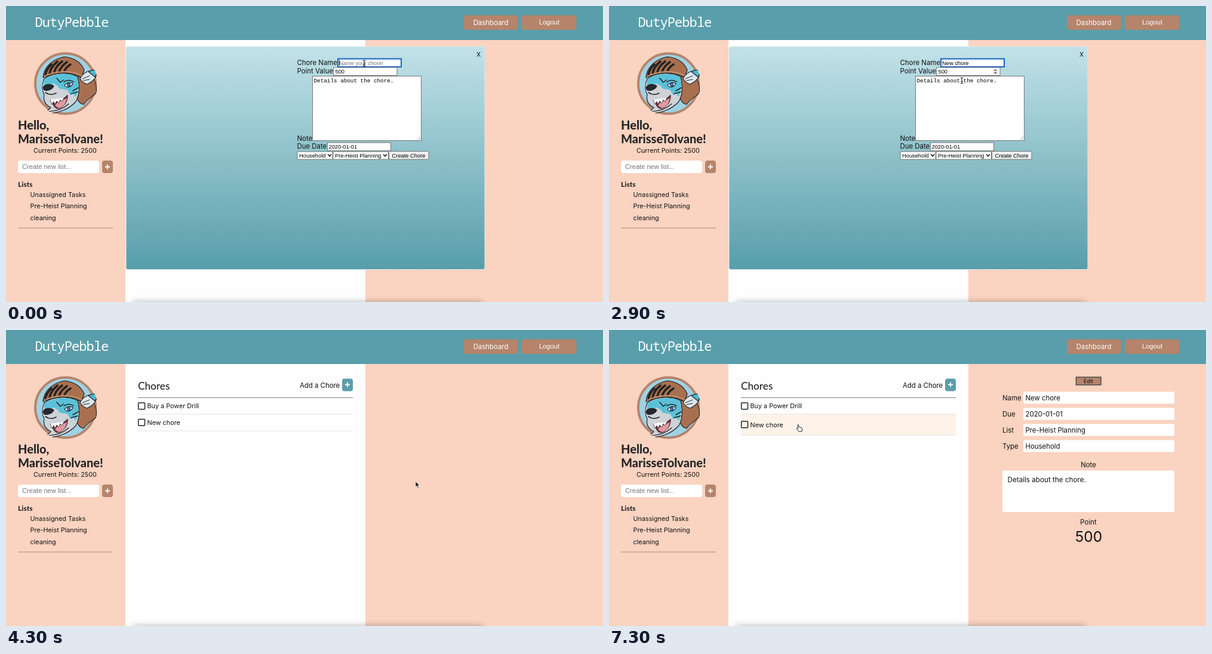
Write an HTML page that moves like this. It is 1000 by 496 pixels and loops after 7.4 s.

```html
<!DOCTYPE html>
<html lang="en">
<head>
<meta charset="utf-8">
<title>Chore dashboard</title>
<style>
html, body { margin: 0; height: 100%; overflow: hidden; background: #fad3c1; }
svg { display: block; width: 100vw; height: 100vh; }
text { font: 11.4px Inter, sans-serif; fill: #111; white-space: pre; }
.small text { font-size: 10.8px; }
.ui text, text.ui { font: 9.3px "Liberation Sans", Arial, sans-serif; fill: #000; }
text.head { font-family: Lato, sans-serif; fill: #262626; }
.mid { text-anchor: middle; }
.box { fill: #fff; stroke: #767676; }
.line { fill: none; stroke: #222; stroke-linecap: round; stroke-linejoin: round; }
.blur { filter: blur(6px); }
</style>
</head>
<body>
<svg viewBox="0 0 1000 496">
  <defs>
    <linearGradient id="sea" x2="0" y2="1">
      <stop stop-color="#c2e2e8"/><stop offset="1" stop-color="#579eaa"/>
    </linearGradient>
    <clipPath id="disc"><circle cx="99.5" cy="130" r="54"/></clipPath>
  </defs>

  <rect width="1000" height="496" fill="#fad3c1"/>
  <rect x="200" y="57" width="402" height="439" fill="#fefefe"/>
  <rect width="1000" height="57" fill="#599eaa"/>
  <text x="48.5" y="35" style="font:500 22px 'Noto Sans Mono',monospace;letter-spacing:-.9px;fill:#fff">DutyPebble</text>
  <g fill="#b5846b">
    <rect x="767" y="15.5" width="90.5" height="24.5" rx="4"/>
    <rect x="864" y="15.5" width="91.5" height="24.5" rx="4"/>
    <rect x="161" y="259" width="18" height="21" rx="4"/>
  </g>
  <text class="mid" x="812" y="31.5" style="fill:#fff">Dashboard</text>
  <text class="mid ui" x="910" y="31" style="font-size:11.1px;fill:#fff">Logout</text>

  <g id="avatar" stroke="#1f2226" stroke-width="1.2" stroke-linejoin="round" clip-path="url(#disc)">
    <circle cx="99.5" cy="130" r="50.5" fill="#9fd2e3" stroke="#b5846b" stroke-width="4"/>
    <path d="M118 119L138 114C149 121 153 133 151 146C145 152 137 155 130 165C117 163 116 146 118 119Z" fill="#a9704f"/>
    <path d="M64 122C80 110 106 110 120 119C124 134 123 150 117 160C106 173 86 181 65 180C65 176 73 174 75 170C66 166 62 158 64 148C60 142 60 132 64 122Z" fill="#cfd2d7"/>
    <path d="M64 123C80 112 106 111 119 119C123 130 121 142 117 152L111 146 108 150 103 141C95 138 90 142 87 134L80 130 64 134Z" fill="#5bc1d8" stroke="none"/>
    <path d="M78 162C86 161 97 156 103 149C104 159 98 169 88 172C82 172 79 167 78 162Z" fill="#732b38" stroke-width=".9"/>
    <path d="M82 167C87 158 95 159 102 154C100 165 95 170 88 171Z" fill="#e29aa0" stroke="none"/>
    <path d="M74 157l3 8 3 -5 2 5 3 -6 3 4 3 -6 3 3 3 -6" fill="#fff" stroke-width=".7"/>
    <path d="M62 137C65 130 75 130 80 134C78 140 69 143 64 141Z" fill="#25282e"/>
    <path d="M98 133C101 128 108 127 112 130C109 136 102 138 98 133Z" fill="#fff"/>
    <circle cx="105" cy="132" r="2.8" fill="#3c72d4" stroke-width=".8"/>
    <path d="M85 121l6 7 5 -4M97 127q8 -5 16 0M112 142l9 -5M109 147l11 -3M66 145q8 6 18 1" class="line" stroke-width="1.6"/>
    <path d="M70 177q22 -1 35 -13" class="line"/>
    <path d="M62 120C63 103 77 89 98 85C115 87 126 95 131 107L127 120C107 109 84 111 62 120Z" fill="#a9704f"/>
    <path d="M66 116Q67 106 76 98M73 113Q75 102 86 93M81 111Q83 101 94 93M89 110Q92 101 102 94M98 109Q100 103 108 98" class="line" stroke-width="3.6"/>
    <path d="M64 118C84 108 109 107 127 117" fill="none" stroke="#c58e69" stroke-width="2"/>
    <path d="M124 122C129 111 141 107 153 107C153 119 147 126 136 131C131 130 127 126 124 122Z" fill="#dce6ed"/>
    <path d="M138 110C143 107 148 107 153 107C152 112 151 116 149 119Z" fill="#4cb9d2"/>
    <path d="M128 122l12 -5M130 125l10 -2" class="line" stroke-width="1"/>
  </g>

  <g style="font-weight:800">
    <text class="head" x="20" y="207" style="font-size:20px;font-weight:800">Hello,</text>
    <text class="head" x="20" y="230" style="font-size:20px;font-weight:800">MarisseTolvane!</text>
    <text class="head" x="20" y="303" style="font-size:12px;font-weight:800">Lists</text>
  </g>
  <g class="small">
    <text class="mid" x="99" y="246">Current Points: 2500</text>
    <text x="40.5" y="319.5">Unassigned Tasks</text>
    <text x="40.5" y="339">Pre-Heist Planning</text>
    <text x="40.5" y="358.5">cleaning</text>
  </g>
  <rect x="20" y="259" width="136" height="21" rx="4" fill="#fff"/>
  <text class="ui" x="27" y="273" style="font-size:11.1px;fill:#757575">Create new list...</text>
  <path d="M166 269.5h8m-4 -4v8" stroke="#fff" stroke-width="1.8"/>
  <path d="M20 372h159" stroke="#a98478"/>

  <g id="list">
    <text class="head" x="221" y="100" style="font-size:17.2px;font-weight:500">Chores</text>
    <text x="492" y="96.5">Add a Chore</text>
    <rect x="563" y="81.5" width="18" height="21" rx="4" fill="#599eaa"/>
    <path d="M568 91.5h8m-4 -4v8" stroke="#fff" stroke-width="1.8"/>
    <path d="M221 113.3h360" stroke="#777"/>
    <rect id="row" x="221" y="141" width="360" height="28"/>
    <path d="M221 141h360" stroke="#e2e2e2"/>
    <path id="rowLine" d="M221 169h360" stroke="#e2e2e2"/>
    <g class="small">
      <rect x="221.7" y="122" width="10.8" height="10.8" rx="1" fill="#fff" stroke="#222" stroke-width="1.5"/>
      <text x="236.5" y="131.3">Buy a Power Drill</text>
      <g id="item">
        <rect x="221.7" y="149.5" width="10.8" height="10.8" rx="1" fill="none" stroke="#222" stroke-width="1.5"/>
        <text x="236.5" y="159">New chore</text>
      </g>
    </g>
  </g>

  <g id="panel">
    <rect x="782.5" y="79" width="41.5" height="13" fill="#b5846b" stroke="#4b4a4a" stroke-width="1.5"/>
    <text class="mid" x="803" y="88.8" style="font-size:9px">Edit</text>
    <g id="fields"></g>
    <text class="mid" x="803" y="229.5">Note</text>
    <rect x="659" y="235.5" width="288" height="69.5" rx="2" fill="#fff"/>
    <text x="667.5" y="254.5" style="font-size:11.7px">Details about the chore.</text>
    <text class="mid" x="803" y="326">Point</text>
    <text class="mid" x="803.5" y="355" style="font-size:24.5px">500</text>
  </g>

  <g id="modal">
    <rect x="201" y="68" width="601" height="373.5" rx="3" fill="url(#sea)" stroke="#d9e9ec"/>
    <text class="mid" x="791.5" y="85" style="font-size:10.5px">X</text>
    <text x="487.5" y="98.5">Chore Name</text>
    <text x="487.5" y="113">Point Value</text>
    <text x="487.5" y="225.5">Note</text>
    <text x="487.5" y="239">Due Date</text>
    <g class="ui">
      <rect id="nameBox" class="box" x="556" y="88.5" width="106" height="13.5"/>
      <text id="name" x="558" y="98.5"></text>
      <path id="caret" d="M0 90.5v9.5" stroke="#000"/>
      <rect class="box" x="548.5" y="103" width="106.5" height="13.5"/>
      <text x="551.5" y="113">500</text>
      <g id="spin">
        <rect x="643" y="105" width="8.5" height="9.5" rx="2" fill="#e8e8e8"/>
        <path d="M645 108.5l2.2 -2.5 2.2 2.5zM645 111l2.2 2.5 2.2 -2.5z" fill="#444"/>
      </g>
      <rect class="box" x="513.5" y="117.5" width="182" height="108"/>
      <path d="M689 224l5 -5m-2 5l2 -2" stroke="#888" stroke-width=".8"/>
      <text x="515.5" y="128" style="font-family:'Liberation Mono',monospace">Details about the chore.</text>
      <rect class="box" x="538.5" y="229" width="106" height="13.5"/>
      <text x="540.5" y="239">2020-01-01</text>
      <rect class="box" x="488" y="244" width="59" height="13" rx="1"/>
      <text x="491" y="253.5">Household</text>
      <rect class="box" x="548" y="244" width="92.5" height="13" rx="1"/>
      <text x="551" y="253.5">Pre-Heist Planning</text>
      <path d="M539.5 249l2.5 2.8 2.5 -2.8M632.5 249l2.5 2.8 2.5 -2.8" class="line" stroke-width="1.7"/>
      <rect id="create" class="box" x="641.5" y="243.5" width="66.5" height="13.5" rx="1"/>
      <text class="mid" x="674.5" y="253.5">Create Chore</text>
    </g>
  </g>

  <rect class="blur" x="212" y="496" width="586" height="12" fill="#000" opacity=".3"/>

  <path id="beam" d="M-2 -5q2 0 2 1.5q0 -1.5 2 -1.5M0 -4v8M-2 5q2 0 2 -1.5q0 1.5 2 1.5M-1.2 1.5h2.4" class="line" stroke-width="1.1"/>
  <path id="arrow" d="M0 0v9l2.1 -2 1.5 3.5 1.7 -.7 -1.5 -3.4h2.9z" fill="#000" stroke="#fff" stroke-width=".7"/>
  <path id="hand" d="M-2.2 -5q1.5 -1 1.8 .6l.6 3 4 1q1.7 .5 1.5 2.2l-.6 2.7v1.5h-5.2l-3.7 -4.5q-.4 -1.6 1.5 -1l1 .8z" fill="#fff" stroke="#222" stroke-width="1"/>
</svg>
<script>
const $ = id => document.getElementById(id);
const show = (id, on) => { $(id).style.display = on ? "" : "none"; };
const set = (id, key, value) => $(id).setAttribute(key, value);

const LOOP = 7400, CREATED = 4300, OPENED = 5400;
const TYPED = "New chore";
const keys = [1300, 1500, 1600, 1800, 1900, 2000, 2100, 2200, 2300];
// time, x, y
const path = [[0, 600, 96], [2500, 600, 96], [2900, 591, 125], [3800, 686, 254],
  [4600, 686, 254], [5200, 318, 164], [LOOP, 318, 164]];

$("fields").innerHTML = [["Name", TYPED], ["Due", "2020-01-01"],
  ["List", "Pre-Heist Planning"], ["Type", "Household"]].map(([label, value], i) => {
    const y = 103.5 + 27 * i;
    return `<text x="659" y="${y + 14}">${label}</text>
      <rect x="694" y="${y}" width="253" height="20" rx="2" fill="#fff"/>
      <text x="697.5" y="${y + 14}">${value}</text>`;
  }).join("");

function pointer(t) {
  const i = path.findIndex(p => p[0] > t);
  const [t0, x0, y0] = path[i - 1], [t1, x1, y1] = path[i];
  const u = (t - t0) / (t1 - t0), e = u * u * (3 - 2 * u);
  return [x0 + (x1 - x0) * e, y0 + (y1 - y0) * e];
}

function drawModal(t) {
  const typed = keys.filter(k => k <= t).length;
  const focused = t < 4100;
  const name = $("name");
  name.textContent = typed ? TYPED.slice(0, typed) : "Name your chore!";
  name.style.fill = typed ? "#000" : "#757575";
  const width = typed ? name.getComputedTextLength() : 0;
  set("caret", "transform", `translate(${558.5 + width})`);
  show("caret", focused && (t - (keys[typed - 1] || 0)) % 1000 < 500);
  $("nameBox").style.stroke = focused ? "#1762c4" : "";
  $("nameBox").style.strokeWidth = focused ? 2 : 1;
  show("spin", t >= 2600 && t <= 2900);
  $("create").style.fill = t >= 4100 ? "#d2d2d2" : "#efefef";
}

function drawCursor(t, x, y) {
  const modal = t < CREATED;
  const overField = y < 117 || (y < 225 && x < 695) || (y < 242 && x < 644);
  const overRow = !modal && x < 581 && y < 176;
  const kind = modal && overField ? "beam" : overRow ? "hand" : "arrow";
  const hidden = t >= keys[0] && t < 2500;
  for (const id of ["beam", "arrow", "hand"]) show(id, id === kind && !hidden);
  set(kind, "transform", `translate(${x} ${y})`);
  return overRow;
}

function draw(now) {
  const t = Math.floor(now % LOOP / 100) * 100;
  const hover = drawCursor(t, ...pointer(t));
  show("modal", t < CREATED);
  show("list", t >= CREATED);
  show("panel", t >= OPENED);
  if (t < CREATED) drawModal(t);
  set("row", "height", hover ? 35 : 28);
  set("row", "fill", hover ? "#fff3e9" : "#fefefe");
  set("rowLine", "transform", `translate(0 ${hover ? 7 : 0})`);
  set("item", "transform", `translate(0 ${hover ? 3.5 : 0})`);
}

let start;
function tick(now) {
  start ??= now;
  draw(now - start);
  requestAnimationFrame(tick);
}
draw(0);
requestAnimationFrame(tick);
</script>
</body>
</html>
```
